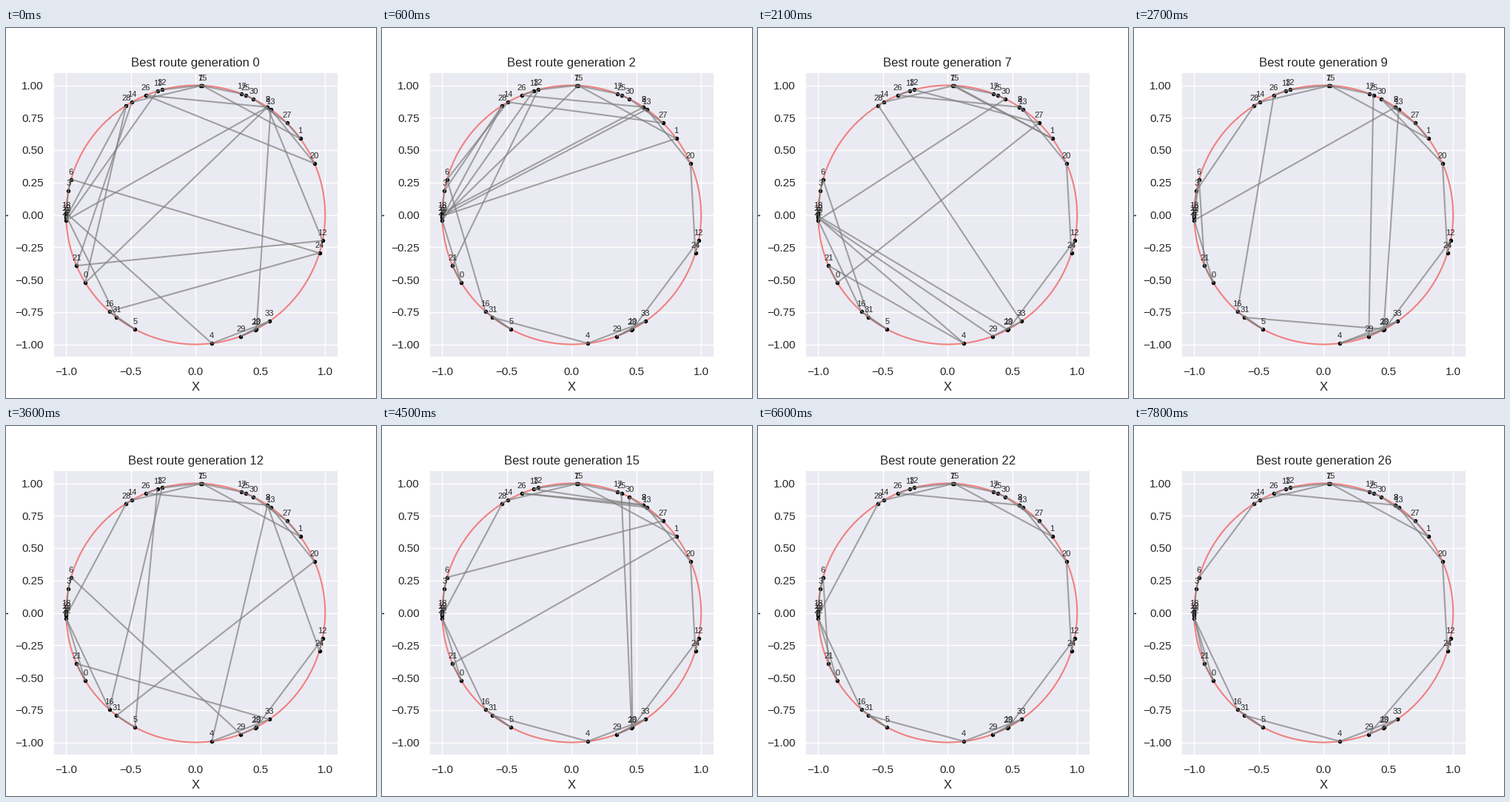
A matplotlib script that plays this animation: 500 px wide and 500 px high, repeating every 8000 ms.

```python
import math

import matplotlib.pyplot as plt
import numpy as np
from matplotlib.animation import FuncAnimation
from matplotlib.collections import LineCollection

INK = "0.15"
TICKS_PER_GENERATION = 3  # 100 ms each
SETTLED = 22              # first generation without random detours
POLISHED = 24             # first generation with the last two improvements
START_DETOURS = 7

plt.rcParams.update({
    "font.family": "Liberation Sans",
    "font.size": 12,
    "text.color": INK,
    "axes.labelcolor": INK,
    "axes.facecolor": "#EAEAF2",
    "axes.edgecolor": "white",
    "axes.linewidth": 1.25,
    "axes.titlesize": 12,
    "axes.labelsize": 12,
    "axes.grid": True,
    "axes.axisbelow": True,
    "grid.color": "white",
    "grid.linewidth": 1,
    "xtick.labelsize": 11,
    "ytick.labelsize": 11,
    "xtick.color": INK,
    "ytick.color": INK,
    "xtick.major.size": 6,
    "ytick.major.size": 6,
    "xtick.bottom": False,
    "ytick.left": False,
})

# Where each city sits on the unit circle, in degrees
angles = np.array([
    211.6, 36.1, 56.3, 169.3, 277.2, 242.1, 164.1, 87.9, 56.3, 181.3,
    298.0, 107.2, 348.5, 54.6, 119.5, 87.1, 228.2, 69.2, 179.2, 180.5,
    23.4, 203.1, 182.4, 297.6, 342.9, 67.4, 112.6, 45.2, 122.4, 290.4,
    63.5, 232.4, 105.0, 304.7,
])
cities = np.column_stack([np.cos(np.radians(angles)), np.sin(np.radians(angles))])


def reverse(route, first, last):
    """Turn round the stretch between two cities (a 2-opt move)."""
    i, j = sorted((route.index(first), route.index(last)))
    return route[:i] + route[i:j + 1][::-1] + route[j + 1:]


# The best route is the clockwise ring with a few stretches turned round
best_route = np.argsort((angles[33] - angles) % 360, kind="stable").tolist()
for ends in [(12, 24), (33, 29), (5, 31), (0, 22), (21, 0),
             (26, 15), (7, 1), (26, 7), (13, 26), (26, 30)]:
    best_route = reverse(best_route, *ends)


def route_at(generation):
    """Best route, with ever more random detours the earlier the generation."""
    route = best_route
    if generation < POLISHED:
        route = reverse(reverse(route, 9, 6), 29, 10)
    rng = np.random.default_rng(generation)
    detours = math.ceil(START_DETOURS * max(0, 1 - generation / SETTLED))
    for _ in range(detours):
        route = reverse(route, *rng.choice(len(route), 2, replace=False))
    return route


fig, ax = plt.subplots(figsize=(5, 5), dpi=100)
ax.set_aspect("equal")
ax.add_patch(plt.Circle((0, 0), 1, fill=False, edgecolor="lightcoral", linewidth=1.5))
ax.scatter(*cities.T, s=16, color="black", linewidths=0)
ax.autoscale_view()
ax.set(xlabel="X", ylabel="Y",
       xticks=np.arange(-1, 1.1, 0.5), yticks=np.arange(-1, 1.1, 0.25))
title = ax.set_title("")

for number, city in enumerate(cities):
    ax.annotate(str(number), city, xytext=(0, 5), textcoords="offset points",
                ha="center", fontsize=8)
edges = ax.add_collection(
    LineCollection([], colors="gray", alpha=0.7, linewidths=1.5, zorder=2),
    autolim=False)


def update(tick):
    generation = tick // TICKS_PER_GENERATION
    stops = cities[route_at(generation)]
    edges.set_segments(np.stack([stops, np.roll(stops, -1, axis=0)], axis=1))
    title.set_text(f"Best route generation {generation}")
    return edges, title


anim = FuncAnimation(fig, update, frames=80, interval=100, repeat=True, repeat_delay=0)
plt.show()
```
